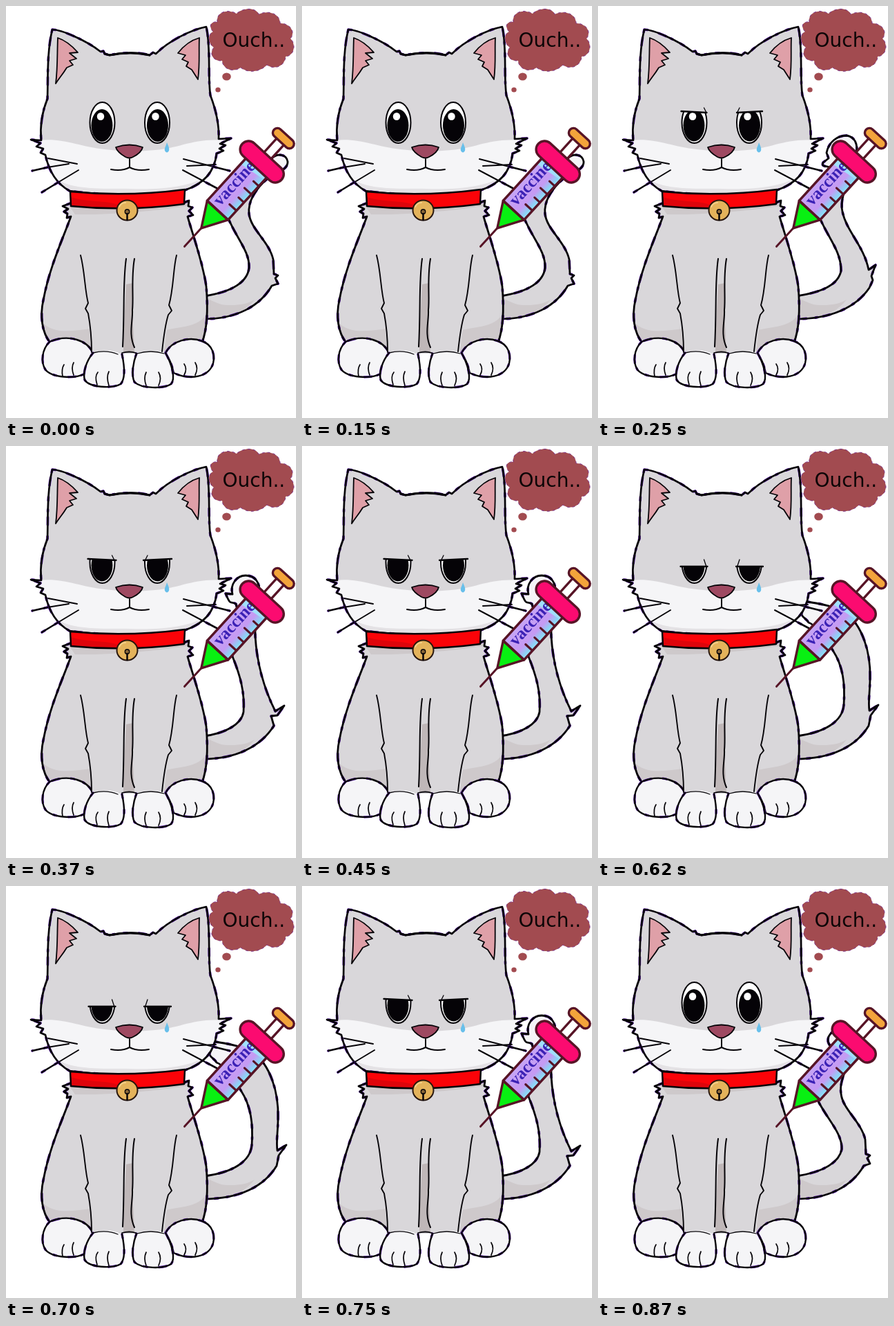
An HTML page with a canvas that plays this animation: 420x595 px, repeating every 1000 ms.

```html
<!DOCTYPE html>
<html lang="en">
<head>
<meta charset="utf-8">
<title>Cat and vaccine</title>
<style>
  html, body { margin: 0; width: 100%; height: 100%; overflow: hidden; background: #fff; }
  canvas { display: block; width: 420px; height: 595px; }
</style>
</head>
<body>
<canvas id="stage"></canvas>
<script>
const canvas = document.getElementById('stage');
const ratio = window.devicePixelRatio || 1;
canvas.width = 420 * ratio;
canvas.height = 595 * ratio;
const ctx = canvas.getContext('2d');

const GREY = '#d9d7da', WHITE = '#f5f5f7', SHADE = '#cec9cb', DEEP = '#bfb7b8';
const INK = '#050307', FRINGE = '#4a0a9a', MAROON = '#571426';

function fill(d, color) {
  ctx.fillStyle = color;
  ctx.fill(new Path2D(d));
}

function line(d, width = 2, color = INK) {
  ctx.strokeStyle = color;
  ctx.lineWidth = width;
  ctx.stroke(new Path2D(d));
}

// Heavy outer contour with a broken violet edge
function contour(d, width = 2.8) {
  ctx.setLineDash([5, 17, 11, 8, 3, 13]);
  line(d, width + 0.9, FRINGE);
  ctx.setLineDash([]);
  line(d, width);
}

function oval(x, y, rx, ry, color, width = 0, edge = INK) {
  ctx.beginPath();
  ctx.ellipse(x, y, rx, ry, 0, 0, Math.PI * 2);
  ctx.fillStyle = color;
  ctx.fill();
  if (width) {
    ctx.strokeStyle = edge;
    ctx.lineWidth = width;
    ctx.stroke();
  }
}

function clipped(d, draw) {
  ctx.save();
  ctx.clip(new Path2D(d));
  draw();
  ctx.restore();
}

// Each tail: outline plus the white end
const TAILS = {
  right: {
    d: 'M286 419C330 413 350 397 352 378C353 355 335 337 322 307C318 285 355 245 384 221C392 212 406 213 408 225C408 237 392 240 380 248C364 262 350 280 352 300C354 322 381 340 387 366L388 387L394 389L390 393L394 401L385 404C368 433 335 452 286 452Z',
    tip: [398, 224, 24]
  },
  behind: {
    d: 'M286 419C330 413 350 397 353 380C354 357 332 337 318 309C316 285 340 250 343 236C326 226 334 214 342 209C362 199 373 226 367 245C360 265 349 282 352 300C354 322 381 340 387 366L388 387L394 389L390 393L394 401L385 404C368 433 335 452 286 452Z',
    tip: [345, 217, 22]
  },
  up: {
    d: 'M286 419C330 413 349 400 352 382C352 355 335 337 322 308C320 285 345 258 342 238C336 228 322 235 326 226L334 220L331 212C334 196 347 187 360 187C372 189 377 199 374 215C372 245 348 270 354 297C360 326 385 346 392 381L402 374L396 390L398 396L393 407C374 435 338 452 286 452Z',
    tip: [352, 206, 34]
  },
  mid: {
    d: 'M286 419C318 415 341 402 344 384C346 355 339 331 328 304C324 278 340 250 333 228C324 223 326 232 318 213L328 214C324 200 334 187 347 187C361 187 368 197 367 213C366 235 360 250 361 275C363 307 370 343 390 383L403 375L393 389L384 390L388 404C369 434 333 452 286 452Z',
    tip: [342, 204, 36]
  },
  left: {
    d: 'M286 419C315 415 330 402 332 382C332 357 308 342 299 317C294 300 277 286 276 263C275 243 288 220 307 207C317 202 322 207 323 217C322 235 316 247 314 263C313 281 323 301 340 313C360 332 374 357 379 382L386 380L383 396L385 407C371 434 335 452 286 452Z',
    tip: [303, 229, 42]
  },
  low: {
    d: 'M286 419C330 414 354 397 356 374C358 343 355 318 340 295C328 276 313 257 305 255C301 247 291 248 297 237L296 224C312 226 340 230 357 240C383 258 395 298 394 335C394 354 391 369 393 382L406 374L395 389L392 404C374 434 338 452 286 452Z',
    tip: [311, 241, 32]
  }
};

function drawTail({ d, tip }) {
  fill(d, GREY);
  clipped(d, () => {
    oval(tip[0], tip[1], tip[2], tip[2], WHITE);
    fill('M286 420C303 427 310 433 325 432C340 432 350 430 360 424C345 444 320 452 286 454Z', SHADE);
  });
  contour(d);
}

const BODY = 'M94 284L82 289L90 293L84 297L89 300L88 306L94 304C82 337 63 377 54 425C49 447 52 472 64 486L124 505L170 502L188 502L230 505L284 486C293 462 292 429 290 405C286 374 272 335 263 304L271 302L265 296L270 291L264 289L265 281L258 284Z';
const BODY_LEFT = 'M93 285L82 289L90 293L84 297L89 300L88 306L94 304C82 337 63 377 54 425C49 447 52 472 64 486';
const BODY_RIGHT = 'M258 284L265 281L264 289L270 291L265 296L271 302L263 304C272 335 286 374 290 405C292 429 293 462 284 486';
const BACK_PAWS = [
  'M63 485C52 496 50 514 57 525C66 537 100 539 114 531C115 519 122 509 126 501C118 483 91 473 63 485Z',
  'M284 484C299 489 303 504 300 516C294 536 267 541 243 530C240 517 236 508 231 501C240 483 266 477 284 484Z'
];
const FRONT_PAWS = [
  'M126 501C116 513 111 530 114 540C121 551 153 553 166 546C174 537 171 517 168 503C154 496 138 496 126 501Z',
  'M189 502C184 515 181 533 186 543C196 553 229 553 239 546C246 538 240 517 231 501C216 496 202 497 189 502Z'
];

function drawBody() {
  fill(BODY, GREY);
  clipped(BODY, () => {
    fill('M89 285H265L262 289Q175 302 100 301Z', SHADE);
    fill('M50 454C66 474 92 470 122 466L124 508H50Z', SHADE);
    fill('M293 440C282 464 258 462 232 468L228 508H295Z', SHADE);
    fill('M174 402L184 400L183 440L186 500H169Z', DEEP);
  });
  contour(BODY_LEFT);
  contour(BODY_RIGHT);
  for (const d of BACK_PAWS) {
    fill(d, WHITE);
    contour(d, 2.4);
  }
  fill('M119 450L124 505L170 502V450ZM184 450L188 502L228 505L235 450Z', GREY);
  for (const d of FRONT_PAWS) {
    fill(d, WHITE);
  }
  contour('M126 501C116 513 111 530 114 540C121 551 153 553 166 546C174 537 171 517 168 503', 2.4);
  contour('M189 502C184 515 181 533 186 543C196 553 229 553 239 546C246 538 240 517 231 501', 2.4);
  line('M126 501Q145 496 162 503M190 502Q210 496 229 502', 1.3);
  line('M108 360C114 382 114 410 119 429L115 437L119 444C122 460 124 475 124 500', 1.9);
  line('M247 360C242 379 243 407 236 432L240 440L235 446C230 462 228 480 226 499', 1.9);
  line('M174 365C169 399 172 437 169 492M186 365C181 393 185 420 183 439C184 455 177 473 186 493', 2);
  line('M168 501Q179 498 188 501', 1.8);
  line('M82 535Q80 524 84 518M98 533Q94 522 98 515M132 547Q128 535 133 529M149 548Q145 536 149 528', 1.7);
  line('M203 548Q199 537 203 529M221 548Q226 537 221 529M258 533Q263 524 258 517M274 533Q279 523 274 515', 1.7);
}

const HEAD = 'M67 34C80 34 117 50 137 66L141 65L143 69L150 71C172 66 195 67 208 71L213 67L217 69C236 50 269 34 290 30C297 61 292 101 296 129C304 150 309 171 308 192L326 191L310 199L318 201L309 206L315 209L305 213C302 240 286 257 259 266Q175 278 92 267C72 256 62 238 57 215L50 212L54 206L44 203L50 198L36 193L51 194C49 173 53 151 60 134C61 102 59 68 67 34Z';

function drawHead() {
  fill(HEAD, GREY);
  clipped(HEAD, () => {
    fill('M30 198C73 185 101 203 143 207Q180 212 216 208C253 206 276 187 330 196V280H30Z', WHITE);
    fill('M55 236C82 269 139 263 181 264C223 265 276 263 305 236L290 280H70Z', '#e4e2e5');
  });
  contour(HEAD, 2.7);
  line('M143 69L150 71Q181 65 208 71', 3.2);

  const ears = [
    'M75 46C87 50 97 59 104 67L92 68L102 76L92 79L97 85L88 89C82 99 77 104 72 112C75 89 74 68 75 46Z',
    'M280 46C266 50 256 59 249 68L260 71L255 77L264 81L261 87L269 92L278 106C281 84 279 64 280 46Z'
  ];
  for (const d of ears) {
    fill(d, '#dfa0a8');
    line(d, 1.8);
  }

  const collar = 'M93 268Q175 276 259 265L258 286Q175 297 94 289Z';
  fill(collar, '#fb0308');
  clipped(collar, () => fill('M92 275C115 284 145 280 162 287L165 300H92Z', '#de050b'));
  line(collar, 2.5);
  oval(175.5, 295, 15, 14.5, '#e4b35b', 2, '#28170e');
  line('M164 290Q167 284 173 284', 2, '#f2d08a');
  oval(175.5, 297, 3.2, 3.2, '#8a6738', 1.4);
  line('M175.5 300V309', 2.5);

  const nose = 'M159 204Q179 197 198 204Q196 212 184 218Q179 221 173 218Q161 211 159 204Z';
  fill(nose, '#9e4961');
  line(nose, 1.8);
  line('M179 221V233M152 236Q168 239 179 233Q190 239 207 236', 2);
  line('M61 220L103 228M91 228L60 233M105 237L75 255', 2);
  line('M257 221L300 232M262 231L304 229M256 237L290 255', 2);
  contour('M60 233L38 238M75 255L52 269M300 232L324 238M290 255L307 264', 2.6);
}

// Lids: top of the visible eye, its slope, and the crease tick
const LIDS = {
  open: null,
  stern: { y: 152, drop: 2, half: 19, tick: 7, shine: true },
  half: { y: 163, drop: 2, half: 21, tick: 7 },
  low: { y: 174, drop: 0, half: 20, tick: 10 }
};

function drawEye(x, side, lid) {
  ctx.save();
  if (lid) {
    const outer = x - side * 30, inner = x + side * 30;
    ctx.clip(new Path2D(`M${outer} ${lid.y}L${inner} ${lid.y + lid.drop}V210H${outer}Z`));
  }
  oval(x, 168.5, 18, 29.5, '#fff', 2);
  oval(x - side * 0.5, 172.5, 15.5, lid ? 23 : 23.5, INK);
  if (!lid || lid.shine) oval(x - 2.5, 159.5, 5.2, 5.6, '#fff');
  ctx.restore();
  if (lid) {
    const a = x - side * lid.half, b = x + side * (lid.half - 1), y = lid.y + lid.drop;
    line(`M${a} ${lid.y}L${b} ${y}`, 2.3);
    line(`M${x + side * 14} ${y - lid.tick}L${x + side * 17} ${y - 1}`, 1.3);
  }
}

function drawEyes(mood) {
  if (mood === 'shut') {
    line('M121 190Q134 197 148 191M195 190Q219 197 237 189', 2.1);
  } else {
    drawEye(139.5, 1, LIDS[mood]);
    drawEye(219, -1, LIDS[mood]);
  }
  fill('M233 197C235 202 237 205 236 209Q233 214 230 209C229 205 232 202 233 197Z', '#68bfea');
}

function pill(x, y, w, h, color) {
  ctx.beginPath();
  ctx.roundRect(x - w / 2, y - h / 2, w, h, Math.min(w, h) / 2);
  ctx.fillStyle = color;
  ctx.fill();
  ctx.strokeStyle = MAROON;
  ctx.lineWidth = 3.4;
  ctx.stroke();
}

function drawSyringe() {
  ctx.save();
  ctx.translate(306.5, 295);
  ctx.rotate(-47.5 * Math.PI / 180);
  line('M-35 0H-71', 3, MAROON);
  fill('M-35 0L0 -20.5V20.5Z', '#08f012');
  line('M-35 0L0 -20.5V20.5Z', 3.4, MAROON);
  fill('M100 -7H134V7H100Z', '#fff');
  line('M100 -7H134M100 7H134', 3.4, MAROON);

  const tint = ctx.createLinearGradient(0, -20, 0, 20);
  tint.addColorStop(0, '#c6a5f5');
  tint.addColorStop(0.65, '#c59af3');
  tint.addColorStop(0.9, '#8bd4f5');
  tint.addColorStop(1, '#9ce5fb');
  fill('M0 -20.5H88V20.5H0Z', tint);
  fill('M72 -19H88V19H78Z', '#a1e0fa');
  line('M0 -20.5H88M0 20.5H88M0 -20.5V20.5', 3.6, MAROON);
  line('M18 20V7M34 20V10M50 20V7M66 20V10', 3.2, MAROON);

  ctx.fillStyle = '#3b21b5';
  ctx.font = 'bold 24.5px "Liberation Serif", "Noto Serif", serif';
  ctx.textAlign = 'center';
  ctx.fillText('vaccine', 45, -1);
  pill(95, 0, 24.5, 77, '#fb0b70');
  pill(141, 0, 13.5, 37, '#f3a43b');
  ctx.restore();
}

function drawThought() {
  const color = '#a24b50';
  const cloud = 'M306 23C304 8 322 4 334 11C344 2 362 2 366 12C381 5 397 12 397 25C411 25 420 37 412 47C421 56 417 72 405 73C404 87 388 93 378 85C367 96 350 97 340 89C327 97 314 90 313 79C299 80 294 68 301 60C291 52 293 40 300 37C293 30 296 22 306 23Z';
  fill(cloud, color);
  ctx.setLineDash([3, 5]);
  line(cloud, 1, '#7a2f86');
  ctx.setLineDash([]);
  oval(319.5, 102, 6.3, 5.5, color);
  oval(307, 121, 3.7, 3.5, color);
  ctx.fillStyle = '#0b0506';
  ctx.font = '28px "DejaVu Sans", sans-serif';
  ctx.textAlign = 'left';
  ctx.fillText('Ouch..', 313.5, 58.5);
}

const POSES = [
  { until: 250, eyes: 'open', tail: 'right' },
  { until: 370, eyes: 'stern', tail: 'up' },
  { until: 500, eyes: 'half', tail: 'mid' },
  { until: 620, eyes: 'shut', tail: 'left' },
  { until: 750, eyes: 'low', tail: 'low' },
  { until: 870, eyes: 'half', tail: 'mid' },
  { until: 1000, eyes: 'open', tail: 'behind' }
];

function render() {
  const time = performance.now() % 1000;
  const pose = POSES.find(p => time < p.until);
  ctx.setTransform(ratio, 0, 0, ratio, 0, 0);
  ctx.fillStyle = '#fff';
  ctx.fillRect(0, 0, 420, 595);
  ctx.lineJoin = 'round';
  ctx.lineCap = 'round';
  drawTail(TAILS[pose.tail]);
  drawBody();
  drawHead();
  drawEyes(pose.eyes);
  drawSyringe();
  drawThought();
  requestAnimationFrame(render);
}

render();
</script>
</body>
</html>
```
